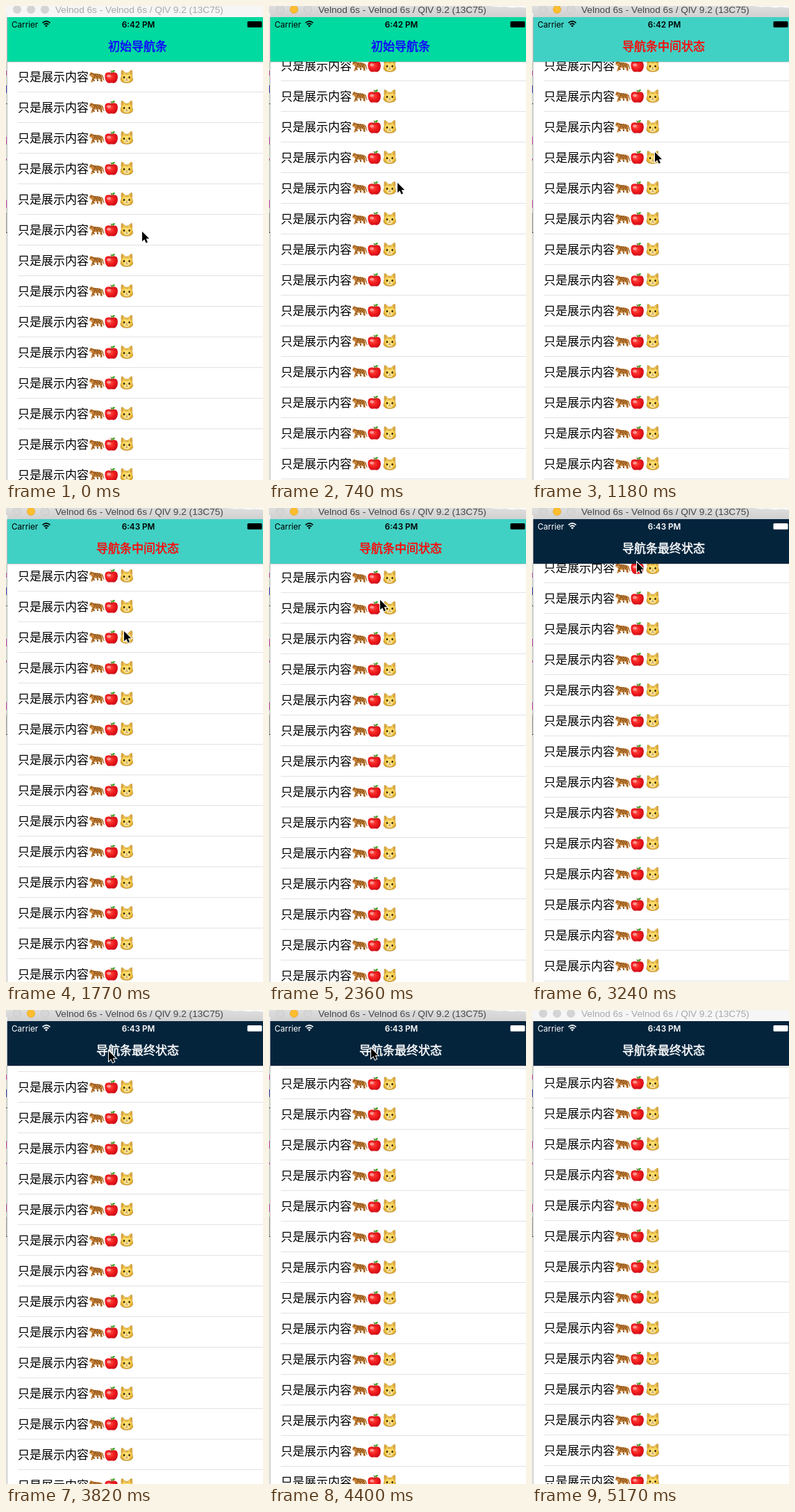
Write an HTML page that moves like this. It is 370 px wide and 681 px high and loops after 5.26 s.

```html
<!DOCTYPE html>
<html lang="zh">
<head>
<meta charset="utf-8">
<title>导航条</title>
<style>
  html, body { margin: 0; width: 100%; height: 100%; overflow: hidden; background: #fff; }
  svg { display: block; width: 370px; height: 681px; }
  .cjk { font: 17px "Noto Sans CJK SC", "Noto Sans CJK", sans-serif; }
  #navTitle { stroke-width: .45px; }
  .status { font: 11.7px Inter, Roboto, sans-serif; }
  #clock { font-weight: 600; }
  #windowTitle { font: 13.65px "Liberation Sans", Arial, sans-serif; }
</style>
</head>
<body>
<svg width="370" height="681" viewBox="0 0 370 681">
  <defs>
    <radialGradient id="red" cx=".4" cy=".4" r=".65">
      <stop offset="0" stop-color="#ff5348"/><stop offset=".5" stop-color="#f21d1f"/><stop offset="1" stop-color="#c80a14"/>
    </radialGradient>
    <radialGradient id="gold" cx=".5" cy=".45" r=".62">
      <stop offset="0" stop-color="#ffe47c"/><stop offset=".65" stop-color="#f2c744"/><stop offset="1" stop-color="#c8962a"/>
    </radialGradient>
    <linearGradient id="activeBar" x2="0" y2="1">
      <stop offset="0" stop-color="#dedede"/><stop offset="1" stop-color="#d0d0d0"/>
    </linearGradient>

    <g id="leopard">
      <path d="M17.500 6C21 6 19.500 10 21.500 13" fill="none" stroke="#a8692c" stroke-width="1.300" stroke-linecap="round"/>
      <path d="M13 9L13.500 14.500H11.800L11 11M6 9L8.500 14.500H6.500L4.500 11" fill="#7d4a1c"/>
      <path d="M1.500 2.500L3 1.500 4.500 2.300 6.500 3C10 4.300 15 3 18 5.300 20 7.500 18.500 10 19.300 15.500H16.800L15.500 11C13 12 11 11.500 9 11L7 12 5 16H2.500L4.500 10.500 4 8.500 1.500 8 .5 5.800Z" fill="#c98237"/>
      <path d="M.8 6.500L3.800 6.800 3 8.300 1.200 8Z" fill="#f2ddb6"/>
      <path d="M7 10C10 11.800 13 11.500 15 10.500L14.500 11.700 9 11.700Z" fill="#e3bd83"/>
      <path d="M6.500 4.500h1.200M9 5h1.300M11.700 5h1.300M14.500 5.300h1.300M7.500 7h1.300M10 7.300h1.300M12.800 7.300h1.300M15.700 7.500h1.300M6.500 9.300h1.200M11.300 9.500h1.200M17 10.500h1.200M4.800 12h1.200M3.500 3.700h1.200M17.300 13.200h1.200M1.800 4.800h1M14.500 9.300h1.200" stroke="#55300f" stroke-width="1.300"/>
    </g>

    <g id="apple">
      <path d="M9.500 4.500C11.500 2.600 16 2.800 18 5.500 20.500 11 17.500 18.700 12.800 18.800 11 18.300 8.500 18.300 6.700 18.800 2 18.700 -1 11 1 5.500 3 2.800 7.500 2.600 9.500 4.500Z" fill="url(#red)"/>
      <path d="M7 5C8.500 5.600 10.500 5.600 12 5" fill="none" stroke="#a3121a" stroke-width=".8"/>
      <ellipse cx="6" cy="8.500" rx="2.800" ry="2" fill="#fff" opacity=".45"/>
      <path d="M9.800 4.700C9.500 3 9.500 2 9 .5" stroke="#6b4218" stroke-width="1" fill="none"/>
      <path d="M9.800 3.200C10 .8 12.500 -.2 15 .2 14.500 2.800 12.500 3.700 9.800 3.200Z" fill="#45a82c"/>
    </g>

    <g id="cat">
      <path d="M1.900 .3C4 .6 5.800 2.300 7 4H11.600C12.800 2.300 14.600 .6 16.700 .3 17.400 3 17.400 6 17 8.500 17.300 10.500 18.500 12.500 18 14.500 16.500 17.700 13 18.500 9.300 18.500 5.600 18.500 2.100 17.700 .6 14.500 .1 12.500 1.300 10.500 1.600 8.500 1.200 6 1.200 3 1.900 .3Z" fill="url(#gold)" stroke="#b17d20" stroke-width=".5"/>
      <path d="M2.600 2L5 4.500 2.800 7ZM16 2L13.600 4.500 15.800 7Z" fill="#cf9550"/>
      <path d="M9.300 4.300v2.300M7.500 4.800v1.500M11.100 4.800v1.500" stroke="#bd8424" stroke-width=".8"/>
      <ellipse cx="9.300" cy="14.500" rx="4" ry="2.500" fill="#ffecae"/>
      <ellipse cx="5.500" cy="10.500" rx="1.200" ry="1.500" fill="#281b0c"/>
      <ellipse cx="13.100" cy="10.500" rx="1.200" ry="1.500" fill="#281b0c"/>
      <path d="M8.200 12.500h2.200L9.300 13.700Z" fill="#87502c"/>
      <path d="M7 14.700Q8.500 16 9.300 13.700 10.100 16 11.600 14.700" stroke="#936019" stroke-width=".6" fill="none"/>
    </g>

    <g id="row">
      <text class="cjk" x="17" y="108">只是展示内容</text>
      <use href="#leopard" x="119.500" y="93.500"/>
      <use href="#apple" x="142" y="92"/>
      <use href="#cat" x="164.500" y="92"/>
      <path d="M17 123.500H370" stroke="#e2e2e4"/>
    </g>
  </defs>

  <rect width="370" height="681" fill="#fff"/>
  <g id="list"></g>

  <rect id="bar" x="2" y="16" width="368" height="64"/>
  <path d="M2 80.500H370" stroke="#000" stroke-opacity=".2"/>
  <text id="navTitle" class="cjk" x="189.500" y="64" text-anchor="middle"></text>
  <g id="status">
    <text class="status" x="8" y="30.500">Carrier</text>
    <text id="clock" class="status" x="190.500" y="30.500" text-anchor="middle"></text>
    <path d="M52.500 24.400Q58 19.500 63.500 24.400M54.600 26.700Q58 23.800 61.400 26.700" fill="none" stroke="currentColor" stroke-width="1.700"/>
    <path d="M56 28.200Q58 26.700 60 28.200L58 30.500Z" fill="currentColor"/>
    <rect x="347.500" y="22" width="21" height="8.700" rx="1.500" fill="currentColor"/>
  </g>

  <rect id="titleBar" width="370" height="16"/>
  <g id="lights">
    <circle cx="16" cy="5" r="5.700"/><circle cx="36" cy="5" r="5.700"/><circle cx="56" cy="5" r="5.700"/>
  </g>
  <path id="topEdge" d="M318 0H370V2.500L358 1.500 350 2.500 340 1 330 1.500Z" fill="#fafafa"/>
  <text id="windowTitle" x="71" y="10">Velnod 6s - Velnod 6s / QlV 9.2 (13C75)</text>

  <g id="strip">
    <rect y="10" width="2" height="671" fill="#f0f0f0"/>
    <rect y="80" width="1" height="218" fill="#d5e6d5"/>
    <rect y="297" width="2" height="28" fill="#a9a9a9"/>
    <path d="M1.500 16V681" stroke="#b9b9b9"/>
    <path d="M.5 93v7M.5 188v11M.5 219v3M.5 279v11" stroke="#cf4fb4"/>
    <path d="M.5 114v11" stroke="#3a45b8"/>
    <path d="M0 140.500H2M0 325.500H2" stroke="#555"/>
  </g>

  <path id="cursor" d="M0 0V14.200L3.300 11.200 5.600 16.400 8 15.300 5.700 10.300H10.200Z" stroke="#fff" stroke-width="2" fill="#000" paint-order="stroke"/>
</svg>

<script>
const LOOP = 5260, ROW = 44, FADE_OUT = 5170;
const $ = id => document.getElementById(id);

// time, pointer x, pointer y, scroll offset
const path = [
  [0, 196, 324, 0],
  [120, 195, 314, 0],
  [1180, 177, 210, 104],
  [1770, 170, 177, 136],
  [2360, 160, 132, 178],
  [3240, 151, 77, 236.5],
  [3820, 148, 59, 255],
  [4540, 147, 54, 261],
  [LOOP, 147, 54, 261]
];

// first change, last change, number of changes
const bursts = [[150, 1180, 8], [1330, 2360, 8], [2510, 3530, 8], [3670, 4540, 7]];
const ticks = [0, FADE_OUT];
for (const [from, to, n] of bursts)
  for (let i = 0; i < n; i++) ticks.push(Math.floor((from + (to - from) * i / (n - 1)) / 10) * 10);
ticks.sort((a, b) => a - b);

const states = [
  { from: 0, title: '初始导航条', bar: '#00d99f', text: '#1000ff', status: '#000' },
  { from: 64, title: '导航条中间状态', bar: '#40d1c4', text: '#ff0606', status: '#000' },
  { from: 200, title: '导航条最终状态', bar: '#04243c', text: '#fff', status: '#fff' }
];

for (let i = 0; i < 15; i++) {
  const row = document.createElementNS('http://www.w3.org/2000/svg', 'use');
  row.setAttribute('href', '#row');
  row.setAttribute('y', i * ROW);
  $('list').append(row);
}

function sample(t) {
  const i = Math.max(1, path.findIndex(p => p[0] >= t));
  const a = path[i - 1], b = path[i];
  const k = (t - a[0]) / (b[0] - a[0]);
  return a.slice(1).map((v, j) => Math.round(v + (b[j + 1] - v) * k));
}

function paintWindow(active) {
  $('titleBar').setAttribute('fill', active ? 'url(#activeBar)' : '#f6f6f6');
  $('windowTitle').setAttribute('fill', active ? '#454545' : '#a8a8a8');
  $('topEdge').setAttribute('visibility', active ? 'visible' : 'hidden');
  [...$('lights').children].forEach((light, i) => {
    const yellow = active && i === 1;
    light.setAttribute('fill', yellow ? '#fdbd2e' : active ? '#d6d6d6' : '#d4d4d4');
    light.setAttribute('stroke', yellow ? '#e0a028' : active ? '#c2c2c2' : '#cecece');
    light.setAttribute('stroke-width', .6);
  });
}

function render(t) {
  const [x, y, offset] = sample(t);
  const state = states.findLast(s => offset >= s.from);
  $('list').setAttribute('transform', `translate(0 ${-(offset % ROW)})`);
  $('bar').setAttribute('fill', state.bar);
  $('navTitle').textContent = state.title;
  $('navTitle').style.fill = $('navTitle').style.stroke = state.text;
  $('status').style.color = $('status').style.fill = state.status;
  $('clock').textContent = t < 1470 ? '6:42 PM' : '6:43 PM';
  $('cursor').setAttribute('transform', `translate(${x} ${y})`);
  $('cursor').setAttribute('visibility', t < FADE_OUT ? 'visible' : 'hidden');
  paintWindow(t >= 150 && t < FADE_OUT);
}

let start, shown;
function frame(now) {
  start ??= now;
  const t = (now - start) % LOOP;
  const tick = ticks.findLast(v => v <= t);
  if (tick !== shown) render(shown = tick);
  requestAnimationFrame(frame);
}
render(0);
requestAnimationFrame(frame);
</script>
</body>
</html>
```
